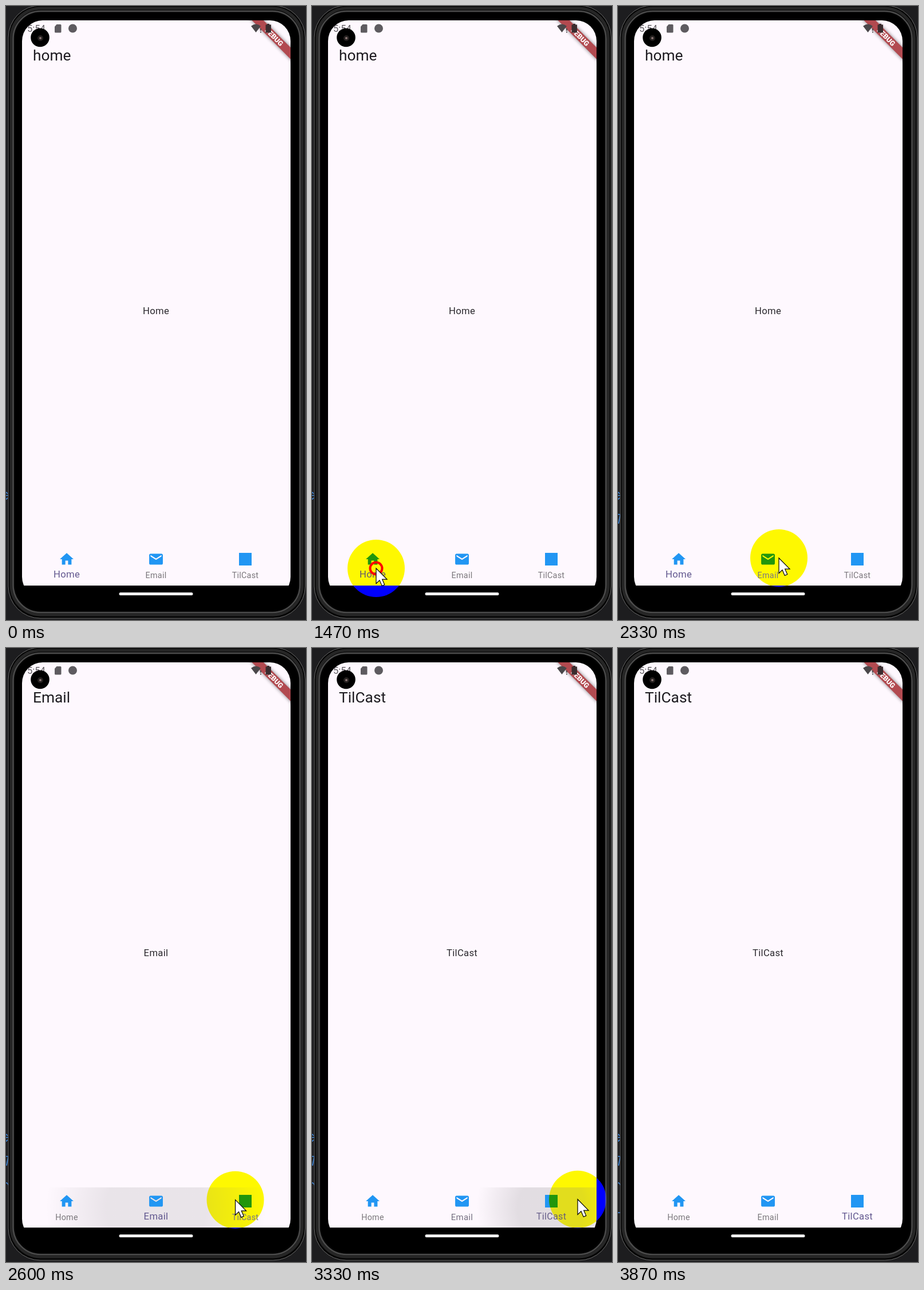
An HTML page that plays this animation: 524x1070 px, repeating every 4.39 s.

```html
<!DOCTYPE html>
<html lang="en">
<head>
<meta charset="utf-8">
<title>Bottom navigation demo</title>
<style>
  html, body { margin: 0; width: 100%; height: 100%; overflow: hidden; background: #1d1d1f; }
  svg { display: block; width: 524px; height: 1070px; font-family: Roboto, Arial, sans-serif; }
  #spot { mix-blend-mode: difference; }
</style>
</head>
<body>
<svg viewBox="0 0 524 1070">
  <defs>
    <clipPath id="display"><rect x="28" y="25" width="469" height="1006" rx="36"/></clipPath>
    <clipPath id="navClip"><rect x="28" y="940" width="469" height="70"/></clipPath>
    <radialGradient id="ink">
      <stop offset=".45" stop-color="#000" stop-opacity=".11"/>
      <stop offset="1" stop-color="#000" stop-opacity="0"/>
    </radialGradient>
    <filter id="blur" x="-20%" y="-100%" width="140%" height="300%"><feGaussianBlur stdDeviation="3"/></filter>
  </defs>

  <rect width="524" height="1070" fill="#1d1d1f"/>
  <g fill="none" stroke="#3f8ae0" stroke-width="1.6">
    <path d="M0 847l3 3M0 853h4M0 860l3-3"/>
    <path id="log0" d="M0 886h4l-3 16"/>
    <path id="log1" d="M0 932q3 0 4 4"/>
    <path id="log2" d="M0 984h4"/>
  </g>

  <g fill="none">
    <rect x="4" y="-1" width="518.5" height="1068" rx="56" fill="#050505" stroke="#6b6b6b"/>
    <rect x="9" y="4" width="508.5" height="1057" rx="52" stroke="#262626" stroke-width="5"/>
    <rect x="12.5" y="9" width="501" height="1048" rx="48" stroke="#4c4c4c" stroke-width="2.5"/>
    <rect x="16" y="12" width="494" height="1042" rx="46" fill="#000"/>
  </g>

  <g clip-path="url(#display)">
    <rect x="28" y="25" width="469" height="985" fill="#fef8fe"/>
    <text id="title" x="47" y="95" font-size="26.3" fill="#1d1b20"/>
    <text id="body" x="262" y="537" font-size="16.7" letter-spacing=".3" text-anchor="middle" fill="#2b292e"/>
    <g clip-path="url(#navClip)"><circle id="ripple" cy="976" fill="url(#ink)"/></g>

    <g fill="#2196f3">
      <path transform="translate(91.7 949.7) scale(1.194)" d="M10 20v-6h4v6h5v-8h3L12 3 2 12h3v8z"/>
      <path transform="translate(247.7 949.7) scale(1.194)" d="M20 4H4c-1.1 0-2 .9-2 2v12c0 1.1.9 2 2 2h16c1.1 0 2-.9 2-2V6c0-1.1-.9-2-2-2zm0 4l-8 5-8-5V6l8 5 8-5z"/>
      <rect x="407" y="953" width="22" height="22"/>
    </g>
    <g id="labels" text-anchor="middle" letter-spacing=".3"></g>

    <g transform="translate(497 25) rotate(45)">
      <rect x="-60" y="33.4" width="120" height="14.3" opacity=".5" filter="url(#blur)"/>
      <rect x="-60" y="33.4" width="120" height="14.3" fill="#b24a50"/>
      <text y="44.9" font-size="12.2" font-weight="900" fill="#fff" text-anchor="middle">DEBUG</text>
    </g>

    <g fill="#5e5b60">
      <text x="37" y="45" font-size="16.5">5:54</text>
      <path d="M88.500 32H95q1.500 0 1.500 1.500V45q0 1.500-1.500 1.500H86.500q-1.500 0-1.500-1.500V36z"/>
      <circle cx="116.500" cy="39" r="7.500"/>
      <path fill="#4a474a" d="M428 35q8.500-7 17 0l-8.500 11zM444 39h1.800v4H444zM444 44.500h1.800v2H444z"/>
      <path fill="#3a2c2f" d="M456 31h4v1.500h3V46.500h-9.500v-14h2.500z"/>
    </g>
  </g>

  <circle cx="59.500" cy="55" r="16.300"/>
  <circle cx="60" cy="56" r="5" fill="#24201f"/>
  <circle cx="60" cy="56" r="2" fill="#8a7474"/>
  <rect x="197.500" y="1022" width="129" height="5" rx="2.500" fill="#f3f3f3"/>

  <circle id="spot" r="50" fill="#00f"/>
  <g id="pointer">
    <circle id="press" r="10.500" fill="none" stroke="#f00" stroke-width="4"/>
    <path d="M0 0V26.500L6 20.800 10.200 30.500 14.800 28.500 10.700 19.200H19z" fill="#fff" stroke="#000" stroke-width="1.200"/>
  </g>
</svg>

<script>
const LOOP = 4390, STEP = 200 / 3;
const $ = id => document.getElementById(id);
const clamp = v => Math.min(1, Math.max(0, v));
const mix = (a, b, p) => a + (b - a) * p;
const show = (el, on) => el.setAttribute("visibility", on ? "visible" : "hidden");
const set = (el, attrs) => { for (const k in attrs) el.setAttribute(k, attrs[k]); };

const tabs = [
  { name: "Home", title: "home", x: 106, press: 1460, ink: 1660, opens: -1000, log: 1600 },
  { name: "Email", title: "Email", x: 262, press: 2130, ink: 2280, opens: 2390, log: 2530 },
  { name: "TilCast", title: "TilCast", x: 418, press: 2930, ink: 3050, opens: 3130, log: 3600 }
];
// time, x, y
const path = [
  [66, 106, 979], [200, 112, 980], [1600, 112, 980], [1800, 227, 977], [1933, 269, 977],
  [2130, 281, 962], [2335, 281, 962], [2467, 352, 963], [2667, 425, 961], [2867, 457, 959.5],
  [3000, 464, 960.5], [3400, 464, 961], [3533, 464, 1005], [3667, 464, 1125]
];

for (const tab of tabs) {
  tab.label = document.createElementNS("http://www.w3.org/2000/svg", "text");
  tab.label.textContent = tab.name;
  tab.label.setAttribute("x", tab.x);
  $("labels").append(tab.label);
}

function pointAt(t) {
  let i = 0;
  while (i < path.length - 2 && t > path[i + 1][0]) i++;
  const [a, b] = [path[i], path[i + 1]];
  const p = clamp((t - a[0]) / (b[0] - a[0]));
  return [mix(a[1], b[1], p), mix(a[2], b[2], p)];
}

function drawLabels(t) {
  tabs.forEach((tab, i) => {
    const next = tabs[i + 1];
    const on = clamp((t - tab.opens) / 200) - (next ? clamp((t - next.opens) / 200) : 0);
    const p = on * on * (3 - 2 * on);
    const rgb = [[122, 98], [119, 88], [123, 143]].map(([a, b]) => Math.round(mix(a, b, p)));
    set(tab.label, { y: mix(997, 996, p), "font-size": mix(14.3, 16.7, p), fill: `rgb(${rgb})` });
  });
}

function drawRipple(t) {
  const tab = tabs.find(({ ink }) => t >= ink && t < ink + 500);
  show($("ripple"), tab);
  if (!tab) return;
  const age = t - tab.ink;
  set($("ripple"), { cx: tab.x, r: 0.6 * age + 1, opacity: clamp(age / 75) * clamp((500 - age) / 240) });
}

function draw(t) {
  const current = tabs.filter(tab => t >= tab.opens).pop();
  $("title").textContent = current.title;
  $("body").textContent = current.name;
  drawLabels(t);
  drawRipple(t);
  tabs.forEach((tab, i) => show($("log" + i), t >= tab.log));

  const [x, y] = pointAt(t);
  const visible = t > 60 && t < 3660;
  show($("spot"), visible);
  show($("pointer"), visible);
  show($("press"), visible && tabs.some(({ press }) => t >= press && t < press + 135));
  set($("spot"), { cx: x, cy: y });
  set($("pointer"), { transform: `translate(${x} ${y})` });
}

const start = performance.now();
function tick() {
  const t = (performance.now() - start) % LOOP;
  draw(Math.floor((t + 1) / STEP) * STEP);
  requestAnimationFrame(tick);
}
tick();
</script>
</body>
</html>
```
